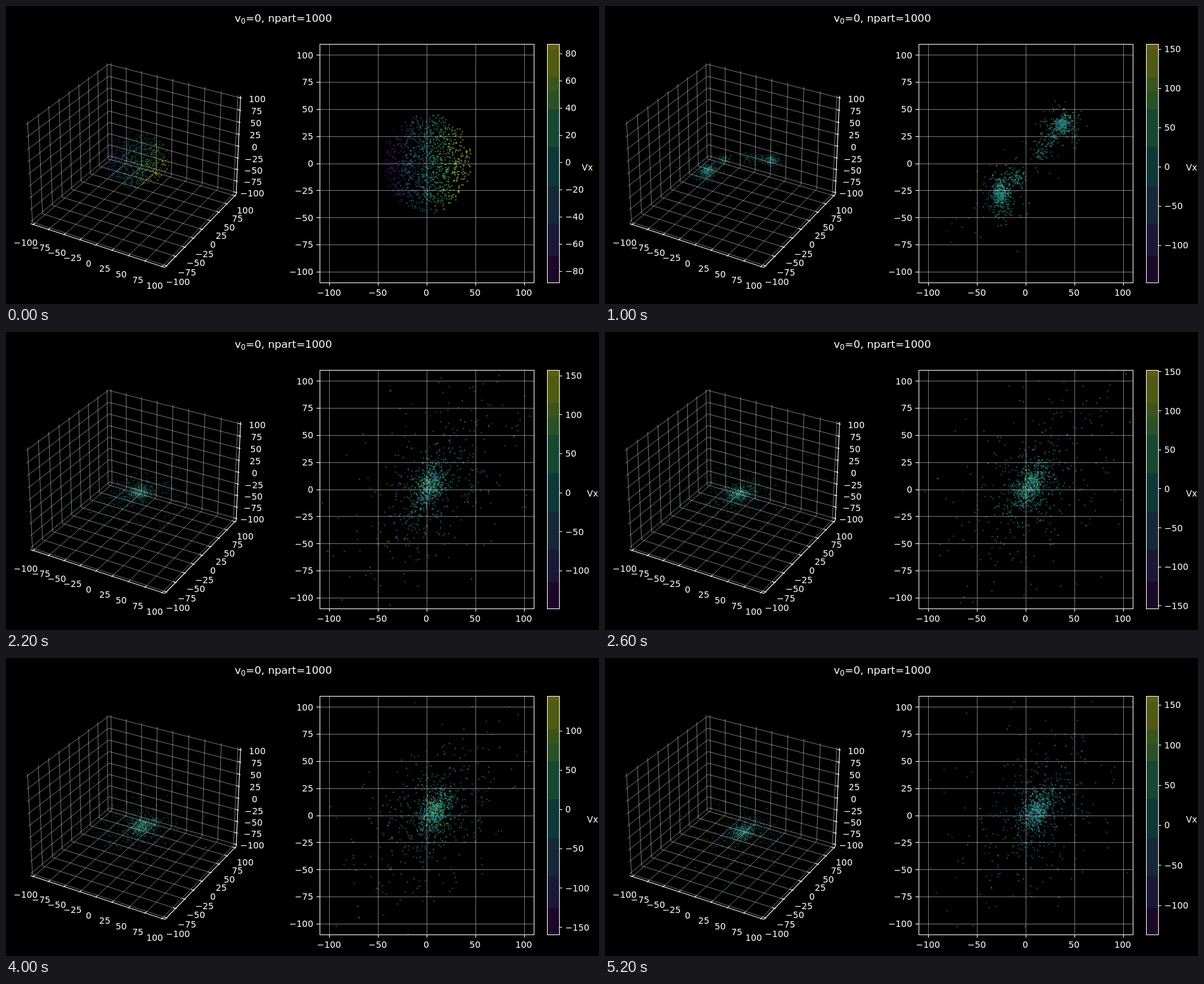
An HTML page with a canvas for the animation above (5.4 s loop, 936x471 px).

```html
<!DOCTYPE html>
<html lang="en">
<head>
<meta charset="utf-8">
<title>Particle collapse</title>
<style>
html, body { margin: 0; width: 100%; height: 100%; overflow: hidden; background: #000; }
canvas, svg { position: absolute; left: 0; top: 0; width: 936px; height: 471px; }
text { font: 13.89px "DejaVu Sans", sans-serif; fill: #fff; white-space: pre; }
.title { font-size: 16.67px; }
.sub { font-size: 11.67px; }
.axis { stroke: #fff; stroke-width: 1.1; fill: none; }
.grid { stroke: #fff; stroke-opacity: .45; stroke-width: 1; fill: none; }
.crisp { shape-rendering: crispEdges; stroke-width: 1; }
</style>
</head>
<body>
<canvas id="dots" width="936" height="471"></canvas>
<svg id="plot" viewBox="0 0 936 471">
  <text class="title" x="361" y="25">v<tspan class="sub" dy="2.7">0</tspan><tspan dy="-2.7">=0, npart=1000</tspan></text>
</svg>
<script>
const STEP_MS = 200, STEPS = 27, COUNT = 1000, EDGE = 104.17;
const TICKS = [-100, -75, -50, -25, 0, 25, 50, 75, 100];
const FLAT = { left: 495, right: 833, top: 60, bottom: 437, cx: 664, cy: 248.5, sx: 338 / 220, sy: 377 / 220 };
const BAR = { left: 854, right: 873 };
const BANDS = [60, 69, 113, 135, 163, 223, 285, 344, 395, 437];
// step, lowest and highest Vx
const RANGES = [[0, -88.6, 87], [5, -147.6, 156.5], [9, -144, 162], [13, -153.7, 152],
  [17, -171.6, 144.7], [23, -147.5, 144], [26, -136.4, 161]];
const VIRIDIS = [[68, 1, 84], [71, 45, 123], [59, 82, 139], [44, 114, 142], [33, 145, 140],
  [40, 174, 128], [94, 201, 98], [173, 220, 48], [253, 231, 37]];

const svg = document.getElementById('plot');
const ctx = document.getElementById('dots').getContext('2d');
const mix = (a, b, k) => a + (b - a) * k;
const mixAll = (a, b, k) => a.map((v, i) => mix(v, b[i], k));
const clamp = v => Math.min(1, Math.max(0, v));
const smooth = k => k * k * (3 - 2 * k);
const label = v => String(v).replace('-', '\u2212');

function viridis(v) {
  const at = clamp(v) * 8, i = Math.min(7, Math.floor(at));
  return `rgb(${mixAll(VIRIDIS[i], VIRIDIS[i + 1], at - i).map(Math.round)})`;
}

// Perspective camera: elevation 30, azimuth -60, box aspect 4:4:3
function project([x, y, z]) {
  x *= .005714; y *= .005714; z *= .004286;
  const depth = 10 - (.433 * x - .75 * y + .5 * z);
  const scale = 2038 / depth;
  return [204.1 + scale * (.866 * x + .5 * y),
    243.4 - scale * (-.25 * x + .433 * y + .866 * z), depth];
}

// ---- axes ----
function add(parent, tag, attrs, content) {
  const el = document.createElementNS('http://www.w3.org/2000/svg', tag);
  for (const key in attrs) el.setAttribute(key, attrs[key]);
  if (content !== undefined) el.textContent = content;
  return parent.appendChild(el);
}
// y is the middle of the digits; baselines sit on whole pixels
const write = (parent, x, y, str, anchor) =>
  add(parent, 'text', { x, y: Math.round(y + 5.4), 'text-anchor': anchor }, str);
const path = (parent, cls, points) => add(parent, 'path', { class: cls, d: 'M' + points.map(p => p.join(' ')).join('L') });
const line3 = (cls, ...points) => path(svg, cls, points.map(p => project(p).slice(0, 2)));
const snap = v => Math.round(v) + .5;

function drawBox() {
  const E = EDGE;
  for (const t of TICKS) {
    line3('grid', [t, -E, -E], [t, E, -E], [t, E, E]);
    line3('grid', [E, t, -E], [-E, t, -E], [-E, t, E]);
    line3('grid', [-E, -E, t], [-E, E, t], [E, E, t]);
  }
  line3('axis', [-E, -E, -E], [E, -E, -E], [E, E, -E], [E, E, E]);
  for (const t of TICKS) {
    line3('axis', [t, -E - 1.7, -E], [t, -E + 3.3, -E]);
    line3('axis', [E + 1.7, t, -E], [E - 3.3, t, -E]);
    line3('axis', [E + 1.7, E, t], [E - 3.3, E, t]);
    const places = [[[t, -125, -125], 1, 1], [[125, t, -125], -4, 2], [[121, 121, t], 0, 4.5]];
    for (const [p, dx, dy] of places) {
      const [x, y] = project(p);
      write(svg, x + dx, y + dy, label(t), 'middle');
    }
  }
}

function drawFlat() {
  const { left, right, top, bottom, cx, cy, sx, sy } = FLAT;
  for (const t of TICKS) {
    const y = cy - t * sy;
    path(svg, 'grid crisp', [[left, snap(y)], [right, snap(y)]]);
    path(svg, 'axis crisp', [[left - 5, snap(y)], [left, snap(y)]]);
    write(svg, left - 10, y, label(t), 'end');
    if (t % 50) continue;
    const x = cx + t * sx;
    path(svg, 'grid crisp', [[snap(x), top], [snap(x), bottom]]);
    path(svg, 'axis crisp', [[snap(x), bottom], [snap(x), bottom + 5]]);
    write(svg, x - .5, bottom + 16, label(t), 'middle');
  }
  add(svg, 'rect', { class: 'axis crisp', x: left + .5, y: top + .5, width: right - left, height: bottom - top });
}

function drawBar() {
  const width = BAR.right - BAR.left;
  for (let i = 1; i < BANDS.length; i++) {
    const a = BANDS[i - 1], b = BANDS[i];
    add(svg, 'rect', { x: BAR.left, y: a, width, height: b - a, 'fill-opacity': .4,
      fill: viridis((437 - (a + b) / 2) / 377) });
  }
  add(svg, 'rect', { class: 'axis crisp', x: BAR.left + .5, y: 60.5, width, height: 377 });
}

drawBox();
drawFlat();
drawBar();
const barTicks = add(svg, 'g', {});

function rangeAt(s) {
  let i = 1;
  while (RANGES[i][0] < s) i++;
  const a = RANGES[i - 1], b = RANGES[i];
  return mixAll(a, b, (s - a[0]) / (b[0] - a[0])).slice(1);
}

function drawBarTicks(low, high) {
  const span = high - low, gap = span < 180 ? 20 : span < 225 ? 25 : 50;
  barTicks.textContent = '';
  for (let v = Math.ceil(low / gap) * gap; v <= high; v += gap) {
    const y = 437 - (v - low) / span * 377;
    path(barTicks, 'axis crisp', [[BAR.right, snap(y)], [BAR.right + 5, snap(y)]]);
    write(barTicks, BAR.right + 9.7, y, label(v), 'start');
  }
  write(barTicks, low > -100 ? 908.7 : 917, 255, 'Vx', 'start');
}

// ---- particles ----
let seed = 20;
function rand() {
  seed = seed + 0x6D2B79F5 | 0;
  let t = Math.imul(seed ^ seed >>> 15, 1 | seed);
  t = t + Math.imul(t ^ t >>> 7, 61 | t) ^ t;
  return ((t ^ t >>> 14) >>> 0) / 4294967296;
}
const gauss = () => Math.sqrt(-2 * Math.log(1 - rand())) * Math.cos(6.2832 * rand());
function direction() {
  const z = 2 * rand() - 1, a = 6.2832 * rand(), r = Math.sqrt(1 - z * z);
  return [r * Math.cos(a), r * Math.sin(a), z];
}

function lumpPoint(ball) {
  const inA = ball[0] + ball[1] + 5 * gauss() < 5;
  const heavy = .3 + .9 * rand() ** 2, pick = rand(), t = rand();
  const centre = inA ? [-26, -28, -13] : [38, 36, -9];
  const spread = inA ? [11, 16, 12] : [11, 10, 11];
  const p = centre.map((c, i) => c + gauss() * spread[i] * heavy);
  if (inA && pick < .1) return [-9 + 4 * gauss(), -13 + 4 * gauss(), 8 + 4 * gauss()];
  const drift = inA ? (pick > .97 ? [-55, -45, 20] : [0, 0, 0])
    : (pick < .35 ? [-26, -30, 15] : [0, 0, 0]);
  return p.map((v, i) => v + drift[i] * t);
}

function makeParticle() {
  const r = 47 * Math.cbrt(rand());
  const ball = direction().map(v => v * r);
  const size = 5 + 14 * rand() + 115 * rand() ** 3;
  return {
    ball, lump: lumpPoint(ball), size,
    major: direction().map(v => v * size),
    minor: direction().map(v => v * size * .7),
    phase: 6.2832 * rand(),
    speed: 1.6 / (1 + size / 25),
    swing: gauss() * (32 + 60 * Math.exp(-size / 14)),
    beat: 6.2832 * rand()
  };
}
const particles = Array.from({ length: COUNT }, makeParticle);

// Orbits stretched along the line on which both clumps met
function halo(p, s) {
  const a = p.phase + p.speed * s, age = Math.max(0, s - 9);
  const [x, y, z] = p.major.map((v, i) => v * Math.cos(a) + p.minor[i] * Math.sin(a));
  const along = (.62 * x + .78 * y) * (1.2 + .35 * Math.exp(-age / 3));
  const across = (.78 * x - .62 * y) * .8;
  return [3 + .5 * age + .62 * along + .78 * across,
    3 + .05 * age + .78 * along - .62 * across,
    -10 - 1.75 * age + .9 * z];
}

function place(p, s) {
  if (s <= 5) return mixAll(p.ball.map(v => v * (1 + .12 * s)), p.lump, smooth(s / 5));
  const h = halo(p, s);
  return s < 9 ? mixAll(p.lump, h, smooth((s - 5) / 4)) : h;
}

const velocity = (p, s) =>
  mix(2 * p.ball[0], p.swing * 1.3 * Math.sin(p.beat + .9 * s), smooth(clamp(s / 5)));

function dot(x, y, r, alpha) {
  ctx.globalAlpha = alpha;
  ctx.beginPath();
  ctx.arc(x, y, r, 0, 6.2832);
  ctx.fill();
}

function draw(s) {
  const [low, high] = rangeAt(s);
  drawBarTicks(low, high);
  ctx.clearRect(0, 0, 936, 471);
  const items = particles.map(p => {
    const pos = place(p, s);
    return { pos, view: project(pos), color: viridis((velocity(p, s) - low) / (high - low)) };
  }).sort((a, b) => b.view[2] - a.view[2]);
  const far = items[0].view[2], near = items[COUNT - 1].view[2];
  for (const { pos, view, color } of items) {
    ctx.fillStyle = color;
    dot(view[0], view[1], 1, mix(.13, .5, (far - view[2]) / (far - near)));
    if (Math.abs(pos[0]) > 110 || Math.abs(pos[1]) > 110) continue;
    const x = FLAT.cx + pos[0] * FLAT.sx, y = FLAT.cy - pos[1] * FLAT.sy;
    dot(x, y, 1.3, .4);
    dot(x, y, .7, .4);
  }
}

let shown = -1;
const start = performance.now();
function tick() {
  const s = Math.floor((performance.now() - start) / STEP_MS) % STEPS;
  if (s !== shown) draw(shown = s);
  requestAnimationFrame(tick);
}
tick();
</script>
</body>
</html>
```
